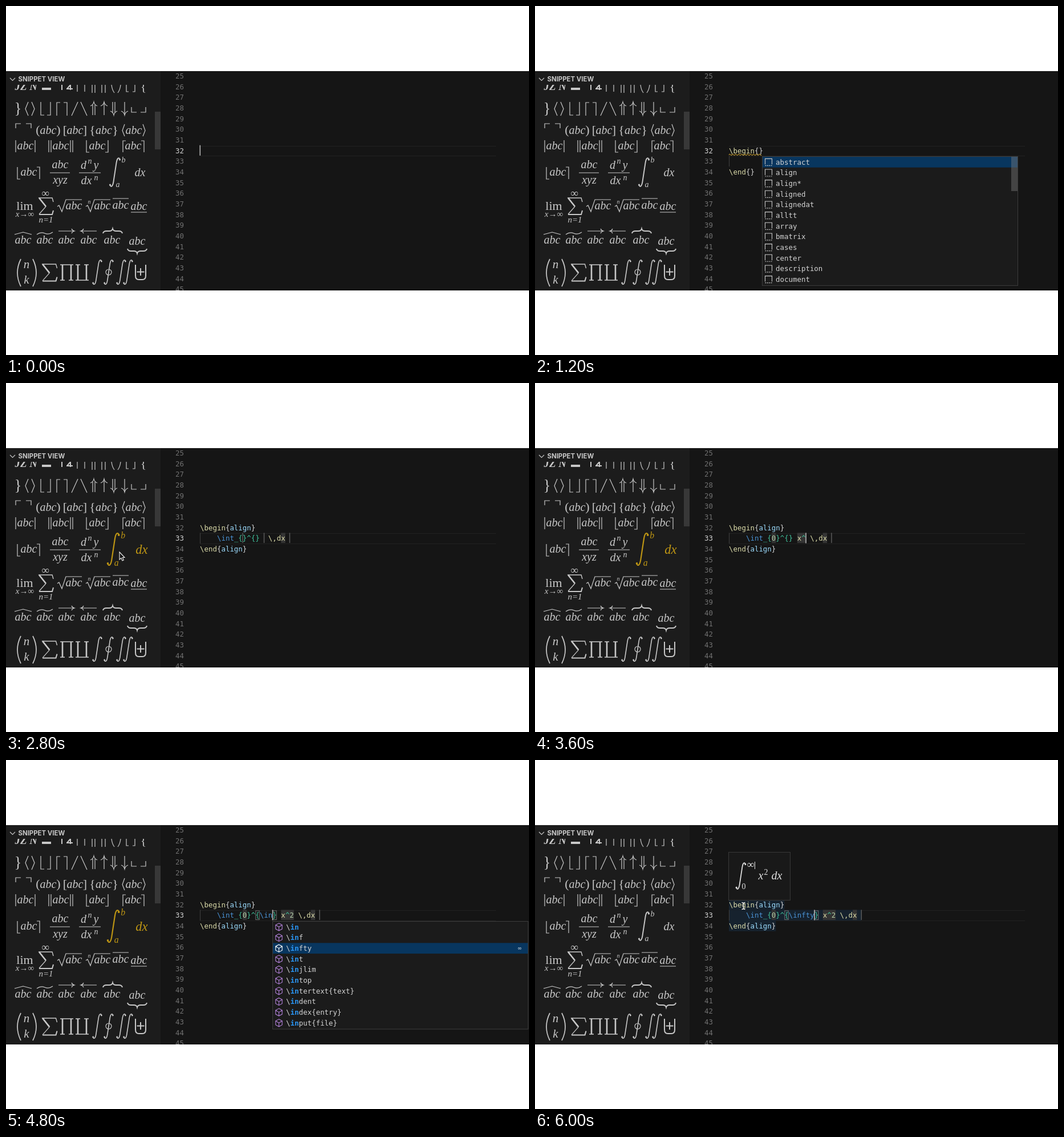
An HTML page with a canvas that plays this animation: 917 by 611 pixels, repeating every 6.4 s.

```html
<!DOCTYPE html>
<html lang="en">
<head>
<meta charset="utf-8">
<title>Snippet view</title>
<style>
  html, body { margin: 0; width: 100%; height: 100%; overflow: hidden; background: #fff; }
  canvas { display: block; }
</style>
</head>
<body>
<canvas id="stage" width="917" height="611"></canvas>
<script>
const ctx = document.getElementById('stage').getContext('2d');
const STEP = 400, STEPS = 16;
const LEFT = 340, CHAR = 7.485, LINE = 18.66, CODE_SIZE = 12.43;
const FG = '#c8c8c8', GOLD = '#be9614', YELLOW = '#dcdcaa', BLUE = '#4a93d6', TEAL = '#40c29c';
const WHITE = '#d4d4d4', CYAN = '#9cdcfe', PURPLE = '#b180d7';

const mono = (size, weight = '') => `${weight} ${size}px "DejaVu Sans Mono", monospace`;
const col = n => LEFT + n * CHAR;
const lineTop = n => 243.7 + (n - 32) * LINE;
const baseline = n => lineTop(n) + 13.9;

function rect(x, y, w, h, color) {
  ctx.fillStyle = color;
  ctx.fillRect(x, y, w, h);
}
function frame(x, y, w, h, color) {
  ctx.strokeStyle = color;
  ctx.lineWidth = 1;
  ctx.strokeRect(x + .5, y + .5, w - 1, h - 1);
}
function text(s, x, y, font, color, align = 'left') {
  ctx.font = font;
  ctx.fillStyle = color;
  ctx.textAlign = align;
  ctx.fillText(s, x, y);
}
function pen(d, width = 1.2, color = FG) {
  ctx.strokeStyle = color;
  ctx.lineWidth = width;
  ctx.stroke(new Path2D(d));
}
function at(x, y, scale, draw) {
  ctx.save();
  ctx.translate(x, y);
  ctx.scale(scale, scale);
  draw();
  ctx.restore();
}
function math(s, x, y, size = 20, style = 'italic', color = FG) {
  text(s, x, y, `${style} ${size}px "Liberation Serif", "DejaVu Serif", serif`, color, 'center');
}
const roman = (s, x, y, size) => math(s, x, y, size, 'normal');

function integral(x, y, scale, color = FG) {
  at(x, y, scale, () => {
    pen('M9 -22C7 -27 4 -25 2.6 -17L-2.6 17C-4 25 -7 27 -9 22', 1.9, color);
    for (const k of [-1, 1]) {
      ctx.fillStyle = color;
      ctx.beginPath();
      ctx.arc(-8.5 * k, 22 * k, 1.6, 0, 7);
      ctx.fill();
    }
  });
}

// ---- snippet panel ----
function delimiters() {
  // cut-off first row
  ctx.save();
  ctx.beginPath();
  ctx.rect(0, 138, 271, 400);
  ctx.clip();
  math('JZ', 26, 147, 19, 'italic bold');
  math('N', 48, 147, 19, 'italic bold');
  rect(63, 143, 16, 4, FG);
  pen('M98 138V147M107 145L113 138V147M106 145H117', 2);
  pen('M125 138V150M138 138V150M151 138V152M156 138V152M168 138V152M174 138V152');
  pen('M185 138Q186 147 190 152M201 138Q200 147 196 152M211 138V150H215M222 150H226V138');
  roman('{', 241, 148, 22);
  ctx.restore();

  roman('}', 21, 188, 27);
  pen('M39 168L34 180L39 192M45 168L50 180L45 192');
  pen('M61 168V191H67M72 191H78V168M89 192V169H95M101 169H107V192M126 168L115 192M131 168L142 192');
  pen('M152 191V173M156 191V173M172 191V168M187 168V187M191 168V187M208 168V191');
  for (const x of [154, 172]) pen(`M${x - 6} 175Q${x - 1} 173 ${x} 168Q${x + 1} 173 ${x + 6} 175`);
  for (const x of [189, 208]) pen(`M${x - 6} 184Q${x - 1} 186 ${x} 191Q${x + 1} 186 ${x + 6} 184`);
  pen('M220 177V186H229M236 186H245V177M17 214V206H26M35 206H44V214');

  for (const [l, r, x, gap] of [['(', ')', 74, 18], ['[', ']', 121, 17.5], ['{', '}', 171.5, 20]]) {
    math('abc', x, 224);
    roman(l, x - gap, 224, 22);
    roman(r, x + gap, 224, 22);
  }
  math('abc', 224, 224);
  pen('M208 207L204 218L208 228M240 207L244 218L240 228');

  for (const x of [34, 96, 160, 223]) math('abc', x, 251);
  pen('M17 235V256M51 235V256M75 235V256M79 235V256M113 235V256M117 235V256');
  pen('M141 235V256H146M174 256H179V235M205 256V236H210M237 236H242V256');
}

function formulas() {
  math('abc', 40, 297);
  pen('M20 282V303H25M54 282H59V303');
  math('abc', 95, 284);
  math('xyz', 95, 311);
  math('d', 136, 285); math('n', 147, 276, 14); math('y', 158, 285);
  math('dx', 141, 312); math('n', 158, 305, 14);
  pen('M77 292H112M128 292H166');

  roman('lim', 33, 357, 22);
  math('x→∞', 33, 369, 15);
  roman('∞', 69, 334, 19);
  sum(57, 336, 1);
  math('n=1', 70, 379, 15);
  math('abc', 119, 356);
  math('abc', 169, 356);
  math('n', 146, 346, 10);
  for (const x of [90, 140]) pen(`M${x} 351l3 -2l5 11L${x + 15} 339h28`);
  math('abc', 201, 355);
  math('abc', 233, 357);
  pen('M187 337H215M219 361H247');

  [30, 68, 106, 145, 186, 230].forEach((x, i) => math('abc', x, i < 5 ? 416 : 418));
  pen('M15 400L30 396L45 400M54 400Q61 395 68 398T82 396');
  pen('M92 394H119M115 390Q116 393 120 394Q116 395 115 398');
  pen('M132 394H159M136 390Q135 393 131 394Q135 395 136 398');
  pen('M170 398q1 -4 6 -4h5q5 0 6 -4q1 4 6 4h5q5 0 6 4', 2);
  pen('M213 425q1 4 6 4h5q5 0 6 4q1 -4 6 -4h5q5 0 6 -4', 2);
}

function sum(x, y, scale) {
  at(x, y, scale, () => {
    pen('M26 7L24 0H1L13 15', 1.4);
    pen('M1 0L13 15', 2.6);
    pen('M13 15L1 28.5', 1.2);
    pen('M1 29H24L26 22', 2);
  });
}

function operators() {
  pen('M26 443Q14 467 26 491M47 443Q59 467 47 491', 1.7);
  math('n', 36, 459, 21);
  math('k', 36, 486, 21);
  sum(63, 452, 1.02);
  for (const [x, y] of [[95, 453], [122, 480]]) {
    pen(`M${x} ${y}h23M${x} ${933 - y}h8M${x + 15} ${933 - y}h8`, 1.5);
    pen(`M${x + 4} 453V480M${x + 19} 453V480`, 2.6);
  }
  for (const x of [160, 180, 202, 214]) integral(x, 466, .86);
  ctx.beginPath();
  ctx.arc(180, 466, 5, 0, 7);
  ctx.lineWidth = 1.2;
  ctx.stroke();
  pen('M227 453V472Q227 479 233 479H239Q245 479 245 472V453M236 459V472M229.500 465.500H242.500', 2);
}

function panel(hover) {
  rect(0, 114, 271, 384, '#1c1c1c');
  pen('M7 126l4.500 4.500l4.500 -4.500', 1.1);
  text('SNIPPET VIEW', 21.5, 132, 'bold 11.4px Inter, sans-serif', FG);
  rect(261, 185, 10, 66, '#383838');
  delimiters();
  formulas();
  operators();
  const color = hover ? GOLD : FG;
  at(213, 291, hover ? 1.13 : 1, () => {
    integral(-22, 0, 1, color);
    math('b', -7, -17, 14, 'italic', color);
    math('a', -17, 26, 14, 'italic', color);
    math('dx', 22, 7, 20, 'italic', color);
  });
}

// ---- editor ----
function code(n, start, parts) {
  for (const [s, color] of parts) {
    text(s, col(start), baseline(n), mono(CODE_SIZE), color);
    start += s.length;
  }
}
const environment = (cmd, name) => [[cmd, YELLOW], ['{', WHITE], [name, CYAN], ['}', WHITE]];

function tokenColor(s) {
  if (/^\\[a-z]/.test(s)) return BLUE;
  if (s === '\\') return '#ce9178';
  if (/^[_^{}]/.test(s)) return TEAL;
  return /\d/.test(s) ? '#b5cea8' : YELLOW;
}

function caret(n, c) {
  rect(col(c) - .5, lineTop(n), 1.6, LINE - .5, '#b4b4b4');
}

function squiggle(length) {
  let d = `M${LEFT} 261`;
  for (let x = 0; x < length * CHAR; x += 5.2) d += 'q1.300 -3 2.600 -1t2.600 1';
  pen(d, 1.1, '#b8922a');
}

function mathLine(low, high, body, cursor) {
  const top = lineTop(33), highAt = 13 + low.length, bodyAt = highAt + high.length + 2;
  const dxAt = bodyAt + body.length + 1;
  for (const [c, len] of [[10, low.length], [bodyAt, body.length], [dxAt + 3, 1], [dxAt + 5, 0]])
    rect(col(c) - (len ? 0 : .5), top, len * CHAR || 1.5, LINE - 1, len ? '#343434' : '#5a5a5a');
  const groups = [[10, low.length], [highAt, high.length]];
  for (const [c, len] of groups) if (cursor === c + len)
    for (const edge of [c - 1, c + len]) frame(col(edge), top + 1, CHAR, LINE - 2, '#707070');
  const source = `\\int_{${low}}^{${high}} ${body} \\,dx`;
  const tokens = source.match(/\\[a-z]+|\\,dx|./g);
  code(33, 4, tokens.map(s => [s, tokenColor(s)]));
  if (cursor) caret(33, cursor);
}

const CUBE = 'M0 -6.500L5.700 -3.500V3.500L0 6.500L-5.700 3.500V-3.500ZM-5.700 -3.500L0 0L5.700 -3.500M0 0V6.500';
function icon(x, y, isCommand, color) {
  at(x, y, 1, () => {
    if (isCommand) return pen(CUBE, 1.1, color);
    pen('M-6 4V-6H6V4', 1.1, FG);
    ctx.setLineDash([2, 1.4]);
    pen('M-6 6H6', 1.2, FG);
  });
}

function popup({ x, line, items, query = '', selected = 0, detail = '', thumb }) {
  const y = Math.round(lineTop(line)) + 1, w = 449, h = items.length * LINE + 3;
  rect(x, y, w, h, '#1b1b1b');
  items.forEach((item, i) => {
    const mid = y + 1 + (i + .5) * LINE, active = i === selected;
    if (active) {
      rect(x + 1, mid - LINE / 2, w - 2, LINE, '#08365f');
      text(detail, x + 437, mid + 3.6, mono(10.6), '#c3cfda', 'right');
    }
    icon(x + 11.5, mid, item[0] === '\\', active ? '#fff' : PURPLE);
    let matched = 0;
    [...item].forEach((ch, k) => {
      const hit = ch === query[matched];
      if (hit) matched++;
      text(ch, x + 24 + k * CHAR, mid + 4.4, mono(CODE_SIZE, hit ? 'bold' : ''), hit ? '#2a96f5' : WHITE);
    });
  });
  if (thumb) rect(x + 437, y + 1, 11, thumb, 'rgba(130,130,130,.4)');
  frame(x, y, w, h, '#3c3c3c');
}

const environments = ['abstract', 'align', 'align*', 'aligned', 'alignedat', 'alltt', 'array',
  'bmatrix', 'cases', 'center', 'description', 'document'];
const beginPopup = {
  x: 362, line: 33, query: 'be', selected: 1, detail: 'Begin a new environment', thumb: 78,
  items: ['because', 'begin', 'beginend', 'beta', 'beth', 'between', 'bezier{n}(x1,y1)(x2,y2)(x3,y3)',
    'breve', 'bfseries', 'backepsilon', 'barwedge', 'bigvee'].map(s => '\\' + s)
};
const popups = {
  1: beginPopup,
  2: beginPopup,
  3: { x: 398, line: 33, items: environments, thumb: 60 },
  4: { x: 398, line: 33, items: environments.slice(1, 5), query: 'ali' },
  11: {
    x: 452, line: 34, detail: 'inline math \\( ... \\)', thumb: 20,
    items: ['\\(', 'abstract', '\\abstractname{name}', '\\acute', '\\addcontentsline{file}{secunit}{entry}',
      '\\adjustlimits{operator1}_{limit1}{operator2}_{limit2}', '\\aleph', ...environments.slice(1, 6)]
  },
  12: {
    x: 467, line: 34, query: 'in', selected: 2, detail: '∞',
    items: ['in', 'inf', 'infty', 'int', 'injlim', 'intop', 'intertext{text}', 'indent', 'index{entry}',
      'input{file}'].map(s => '\\' + s)
  }
};

// step at which each state of the integral line begins: low, high, body, cursor column
const edits = [
  [7, '', '', '', 0], [8, '0', '', '', 11], [9, '0', '', 'x^', 18],
  [11, '0', '\\', 'x^2', 15], [12, '0', '\\in', 'x^2', 17], [13, '0', '\\infty', 'x^2', 20]
];

function arrowPointer(x, y) {
  at(x, y, 1, () => {
    const shape = new Path2D('M0 0V13L3 10.500L5 15L7.300 14L5.300 9.500H9Z');
    ctx.fillStyle = '#111';
    ctx.fill(shape);
    ctx.strokeStyle = '#eee';
    ctx.lineWidth = 1.1;
    ctx.stroke(shape);
  });
}

function preview() {
  rect(339, 161, 109, 85, '#191919');
  frame(339, 161, 109, 85, '#383838');
  integral(361, 203, .92, '#e0e0e0');
  math('∞', 378, 189, 18, 'normal', '#e0e0e0');
  rect(385, 178, 1, 13, '#e0e0e0');
  math('0', 366, 226, 14, 'normal', '#e0e0e0');
  math('x', 396, 209, 20, 'italic', '#e0e0e0');
  math('2', 405, 201, 14, 'normal', '#e0e0e0');
  math('dx', 424, 209, 20, 'italic', '#e0e0e0');
}

function editor(step) {
  const current = step < 5 ? 32 : 33;
  rect(271, 114, 646, 384, '#151515');
  for (let n = 25; n <= 45; n++)
    text(n, 312, baseline(n), mono(CODE_SIZE), n === current ? '#d0d0d0' : '#707070', 'right');
  for (const dy of [1, LINE - .5]) rect(LEFT, Math.round(lineTop(current) + dy), 519, 1, '#222');

  if (step === 15)
    [[32, 13], [33, 31], [34, 11]].forEach(([n, len]) => rect(LEFT, lineTop(n), len * CHAR, LINE, '#16222e'));

  if (step === 0) caret(32, 0);
  else if (step < 3) code(32, 0, [['\\be', YELLOW]]);
  else {
    const name = step < 4 ? '' : step < 5 ? 'ali' : 'align';
    code(32, 0, environment('\\begin', name));
    code(34, 0, environment('\\end', name));
    rect(LEFT, lineTop(33), 1, LINE, '#404040');
  }
  if (step > 1 && step < 6) squiggle(step < 3 ? 3 : 7);
  if (step === 5 || step === 6) caret(33, 4);

  const edit = edits.filter(e => e[0] <= step).pop();
  if (edit) mathLine(...edit.slice(1));

  if (step === 2) {
    ctx.fillStyle = '#fc0';
    ctx.beginPath();
    ctx.arc(348, 231, 5, 0, 7);
    ctx.fill();
    rect(345.5, 234, 5, 6, '#fc0');
    rect(346.5, 237, 3, 1, '#151515');
  }
  if (popups[step]) popup(popups[step]);
  if (step === 15) preview();
  if (step >= 14) pen('M362.500 249.500Q365 249.500 365.500 251Q366 249.500 368.500 249.500M365.500 251V260M362.500 261.500Q365 261.500 365.500 260Q366 261.500 368.500 261.500', 1.3, '#eee');
}

function draw(now) {
  const step = Math.floor(now / STEP) % STEPS;
  rect(0, 0, 917, 611, '#fff');
  ctx.save();
  ctx.beginPath();
  ctx.rect(0, 114, 917, 384);
  ctx.clip();
  editor(step);
  panel(step >= 6 && step < 14);
  if (step === 6 || step === 7) arrowPointer(199, 296);
  ctx.restore();
  requestAnimationFrame(draw);
}
requestAnimationFrame(draw);
</script>
</body>
</html>
```
